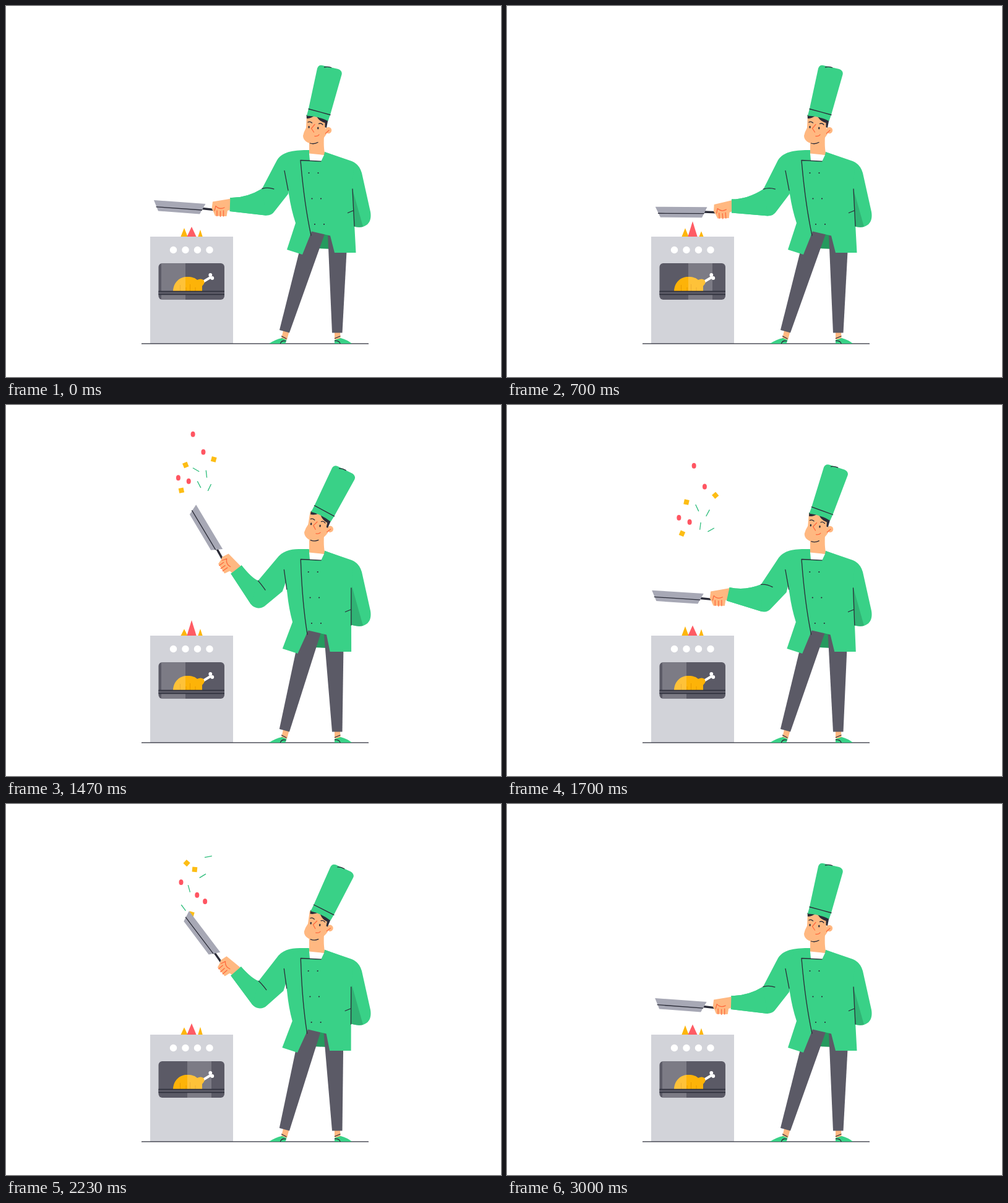
Write an HTML page that moves like this. It is 800 by 600 pixels and loops after 3.03 s.

```html
<!DOCTYPE html>
<html lang="en">
<head>
<meta charset="utf-8">
<title>Chef at the stove</title>
<style>
  html, body { margin: 0; width: 100%; height: 100%; overflow: hidden; background: #fff; }
  svg { display: block; width: 800px; height: 600px; }
  .green { fill: #39d187; }
  .skin { fill: #ffb881; }
  .dark { fill: #2b2c38; }
  .grey { fill: #5b5a66; }
  .line, .warm { fill: none; stroke: #2b2c38; stroke-width: 1.3; stroke-linecap: round; stroke-linejoin: round; }
  .warm { stroke: #ff6a3d; }
</style>
</head>
<body>
<svg viewBox="0 0 800 600">
  <g id="flames">
    <path fill="#fdb60d"/><path fill="#ff5c64"/><path fill="#fdb60d"/>
  </g>

  <g id="stove">
    <path fill="#d2d3d9" d="M233 373H367V546H233Z"/>
    <path d="M270.500 394.500H330" stroke="#fff" stroke-width="11.500" stroke-linecap="round" stroke-dasharray="0 19.500"/>
    <clipPath id="glass"><rect x="246.5" y="416" width="106.5" height="59" rx="6"/></clipPath>
    <g clip-path="url(#glass)">
      <path class="grey" d="M246 415H354V476H246Z"/>
      <path d="M317 447L331 438.500" stroke="#fff" stroke-width="4"/>
      <circle cx="330.300" cy="435" r="2.900" fill="#fff"/><circle cx="333.300" cy="440" r="2.900" fill="#fff"/>
      <path fill="#fdb308" d="M270 461C271 446 281 438 293 438C301 438 306 440 309 443Q315 440 319 443Q323 447 317 453V461Z"/>
      <path stroke="#e89a00" d="M281.500 451V461M291 455V461M297.500 450V461M306 455V461"/>
      <path id="gloss" fill="#fff" fill-opacity=".2" d="M0 415H39V476H0Z"/>
      <path class="grey" d="M246 461.500H354V466.500H246Z"/>
      <path class="line" d="M246 461.500H354M246 466.500H354"/>
    </g>
  </g>

  <path class="line" d="M219.500 546.200H585.500"/>

  <g class="skew"><path fill="#259a5e" d="M512 366L524 371L526 393L503 392Z"/></g>

  <g id="feet">
    <path class="skin" d="M448 525L457.500 527L454 540L445 538ZM531 527H540L540.500 539H531Z"/>
    <path class="green" d="M425 546Q436 539 446 537L453.500 540L451.500 546ZM531 540L541 537Q552 540 559 546H531Z"/>
    <path class="line" d="M445.500 534L453 538M443.500 545.500Q446 540 452 542M531.500 537.500L540 534M531.500 541.500Q538 541 540 545.500"/>
  </g>
  <g id="legs" class="grey">
    <path d="M483 361L516 366L458 528.500L442 524Z"/>
    <path d="M520 368L551 388L543.500 528.500H527Z"/>
  </g>

  <g id="farArm">
    <path class="green" d="M515 236L559 251Q571 256 575 270L589 333Q592 352 577 357Q569 359 561 356L552 300Z"/>
    <path fill="#30b374" d="M559 293L577 357Q569 359 555 355Z"/>
  </g>

  <path id="sleeveBack" class="green"/>
  <g class="skew">
    <path class="green" d="M490 233L464 240L450 266L457 304Q461 330 468 351L454 394L479 402L494 364.500L524 371.500L531 399H565.500L560 296L562 253L515 236Z"/>
    <path class="line" d="M450 266.500L456 298M493 371Q482 320 476 249.500L509 251M560 296L563 356M552.500 334.500L561 331"/>
    <path class="line" d="M489.500 270h0M504.500 270h0M494.500 311.500h0M509 311.500h0M499 353h0M514 353h0" style="stroke-width:2.200"/>
  </g>

  <path class="skin" d="M490 216L514 210Q513 228 515 237L513 243L490 240Z"/>
  <path fill="#fff" d="M490 238.500L514 241L509.500 250.500L491 249.500Z"/>
  <g id="face">
    <circle class="skin" cx="521" cy="201" r="5.200"/>
    <path class="skin" d="M486 176L519 182L516 199L518 207Q513 216 504 221Q496 224 488 221Q480 217 480 210Q481 204 485 197Z"/>
    <path class="warm" d="M499 191.500L493.500 198L497.500 204M499 210.500Q504 211 506 208M516.500 206L522 201"/>
    <path class="line" d="M488 188Q491 186 494.500 189M505.500 190.500Q509 188.500 512 192M491.500 222Q498 224 504 220.500"/>
    <ellipse class="dark" cx="489.600" cy="195.800" rx="1.200" ry="2"/>
    <ellipse class="dark" cx="504.300" cy="197.600" rx="1.200" ry="2"/>
  </g>
  <g id="hat">
    <path class="dark" d="M485.500 176L499 177Q493 182 486 182ZM502 179L520.500 184L518 197L515.500 196V189Q507 187 502 179Z"/>
    <path class="green" d="M486 177.500L489 166L503 101Q505 95 511 96L537 102Q544 105 542.500 111L524 176L520.500 186Q504 178 486 177.500Z"/>
    <path class="line" d="M489 166.500L524 176M514.500 99Q520 97.500 525.500 99.500"/>
  </g>

  <g id="bits"></g>
  <g id="pan">
    <path d="M317 327.500L336 329.500" stroke="#2b2c38" stroke-width="3.400"/>
    <path fill="#a7a8b5" d="M239 314L322.500 320L313 336.500L246 331.500Z"/>
    <path class="line" d="M243 324.800L316.500 330"/>
    <path class="skin" d="M334 316.500L364 311.500V329L358 331L356.500 340L338 339.500L335 332L332.500 328Z"/>
    <path class="warm" d="M337 331L339 323.500Q345 330 353 326M341 331V339.500M346.500 332V340.500M351.500 331V340"/>
  </g>
  <path id="sleeve" class="green"/>
  <path id="crease" class="line"/>
</svg>
<script>
const LOOP = 3030, TAU = 2 * Math.PI;
const $ = s => document.querySelector(s);
const put = (el, v) => el.setAttribute("transform", v);
const smooth = (a, b, t) => {
  const u = Math.min(1, Math.max(0, (t - a) / (b - a)));
  return u * u * (3 - 2 * u);
};

// Key poses of the cuff: time, x, y, pan turn.
const poses = [
  [0, 362, 321, 0], [330, 400, 329, 6], [740, 362, 322, -5],       // stir
  [1070, 369, 297, -15], [1470, 372, 266, 55], [1720, 357, 308, -4], // first toss
  [1930, 379, 312, -18], [2290, 371, 267, 54], [2530, 379, 332, 21], // second toss
  [LOOP, 362, 321, 0]
];

// Smooth curve through the poses that rests at every local extreme.
function cuffAt(t) {
  const slope = (i, c) => {
    const a = poses[i - 1], b = poses[i], d = poses[i + 1];
    if (!a || !d || (b[c] - a[c]) * (d[c] - b[c]) <= 0) return 0;
    return (d[c] - a[c]) / (d[0] - a[0]);
  };
  const i = poses.findIndex(p => p[0] > t) - 1;
  const a = poses[i], b = poses[i + 1], w = b[0] - a[0];
  const u = (t - a[0]) / w, v = 1 - u;
  return [1, 2, 3].map(c =>
    a[c] * v * v * (1 + 2 * u) + b[c] * u * u * (3 - 2 * u)
    + w * u * v * (v * slope(i, c) - u * slope(i + 1, c)));
}

// One swell of the body per toss.
const swell = t => [1410, 2250].reduce((sum, c) => sum + Math.exp(-(((t - c) / 233) ** 2)), 0);

const look = {
  p: '<ellipse rx="3.5" ry="4.500" fill="#ff5562"/>',
  c: '<path fill="#fdbd14" d="M-4-4H4V4H-4Z"/>',
  s: '<path stroke="#2dbd7b" stroke-width="1.300" d="M-6 0H6"/>'
};
// Peas, cubes and sticks from the highest down; shift and curve set their spread.
const tosses = [
  { kinds: "ppccssppssc", up: 1240, top: 1480, land: 1960, high: 47, drop: 91, shift: .44, curve: .5 },
  { kinds: "sccspsppsc", up: 2110, top: 2300, land: 2830, high: 61, drop: 107, shift: .97, curve: 1 }
];
const bits = tosses.flatMap(toss => [...toss.kinds].map((kind, i, all) => {
  const f = (i / (all.length - 1)) ** toss.curve;
  const el = document.createElementNS("http://www.w3.org/2000/svg", "g");
  el.innerHTML = look[kind];
  $("#bits").append(el);
  return {
    el, up: toss.up, top: toss.top, land: toss.land - 130 * f,
    x: 274 + 64 * ((toss.shift + .27 * i) % 1),
    peak: toss.high + toss.drop * f,
    spin: kind === "p" ? 0 : .15, turn: kind === "p" ? 0 : 53 * i
  };
}));

function drawBit({ el, up, top, land, x, peak, spin, turn }, t) {
  const flying = t > up && t < land;
  el.style.display = flying ? "" : "none";
  if (!flying) return;
  const rise = Math.max(0, (top - t) / (top - up));
  const fall = Math.max(0, (t - top) / (land - top));
  const y = peak + (245 - peak) * rise ** 2 + (330 - peak) * fall ** 2.2;
  put(el, `translate(${x + (300 - x) * .7 * rise} ${y}) rotate(${turn + spin * (t - top)})`);
}

const shoulder = [462, 260], UPPER = 75, FORE = 59;

function drawArm(cx, cy) {
  const dx = cx - shoulder[0], dy = cy - shoulder[1], d = Math.hypot(dx, dy);
  const bend = Math.acos((UPPER ** 2 + d * d - FORE ** 2) / (2 * UPPER * d));
  const a = Math.atan2(dy, dx) - bend;
  // Point at a distance along a limb and to its upper side.
  const on = (o, ang) => (l, s) => [
    o[0] + l * Math.cos(ang) - s * Math.sin(ang),
    o[1] + l * Math.sin(ang) + s * Math.cos(ang)
  ];
  const arm = on(shoulder, a), elbow = arm(UPPER, 0);
  const b = Math.atan2(cy - elbow[1], cx - elbow[0]);
  const fore = on(elbow, b), fold = arm(56, 21);
  const lower = `Q${fore(FORE - 26, 11)} ${fore(FORE, 11)}L${fore(FORE, -11)}L${fore(0, -16)}`;
  $("#sleeveBack").setAttribute("d",
    `M490 233C468 233 ${arm(-14, 26)} ${arm(4, 26)}L${fold}${lower}`
    + `A16 16 0 0 0 ${arm(UPPER, -16)}L${arm(40, -19)}L${shoulder}Z`);
  // The front piece stops at the elbow so the coat lines stay visible.
  $("#sleeve").setAttribute("d", `M${fold}${lower}Z`);
  const end = [-19 * Math.cos(b), -19 * Math.sin(b)];
  $("#crease").setAttribute("d", `M${fold}q${end[0] / 2 + 2 * Math.sin(b)} ${end[1] / 2 - 3} ${end}`);
}

function draw(t) {
  const [cx, cy, turn] = cuffAt(t);
  drawArm(cx, cy);
  put($("#pan"), `translate(${cx} ${cy}) rotate(${turn}) translate(-362 -321)`);

  // The hat follows the body a little late.
  const lean = swell(t), tilt = 13 * swell(t - 60);
  const k = -.055 * lean, j = .042 * lean;
  document.querySelectorAll(".skew").forEach(el => put(el, `matrix(1 0 ${k} 1 ${-255 * k} 0)`));
  put($("#legs"), `matrix(1 0 ${j} 1 ${-528 * j} 0)`);
  put($("#hat"), `rotate(${tilt} 510.5 206.5)`);
  put($("#face"), `rotate(${tilt * .46} 525 228)`);

  [[288, 6, 360, 2.5], [300, 8, 352, 5], [314, 4, 362.5, 2]].forEach(([x, half, tip, sway], i) => {
    const y = tip + sway * Math.cos(7 * TAU * t / LOOP + 2 * (i - 1));
    $("#flames").children[i].setAttribute("d", `M${x - half} 374L${x} ${y}L${x + half} 374Z`);
  });

  const s = t % (LOOP / 2);
  put($("#gloss"), `translate(${251 + 42 * (smooth(230, 450, s) - smooth(1050, 1470, s))})`);

  bits.forEach(bit => drawBit(bit, t));
}

const start = performance.now();
function tick() {
  draw((performance.now() - start) % LOOP);
  requestAnimationFrame(tick);
}
tick();
</script>
</body>
</html>
```
